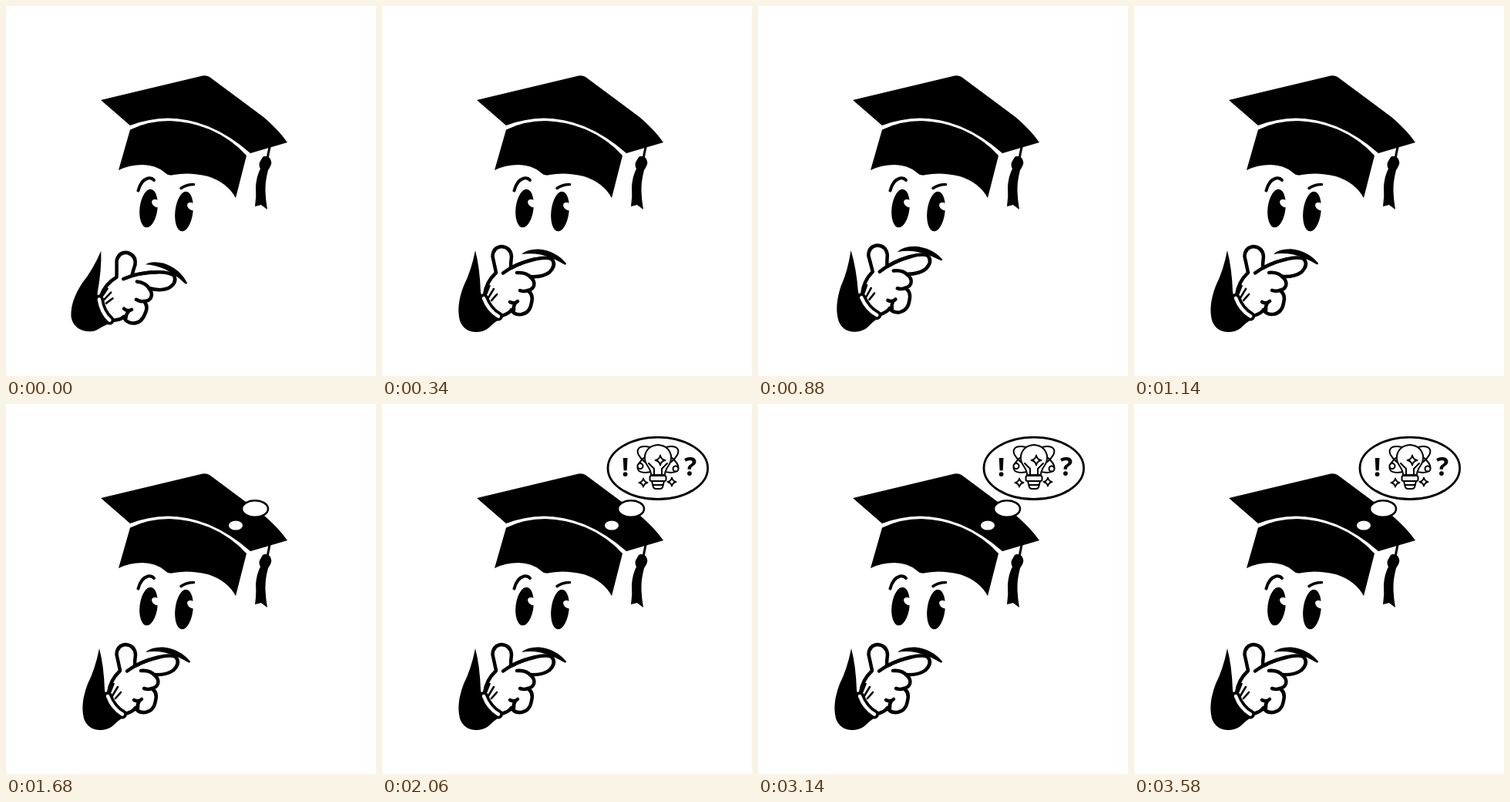
Recreate the animation shown at these times as an HTML page. Size 480x480 px, loop 3600 ms.

```html
<!DOCTYPE html>
<html lang="en">
<head>
<meta charset="utf-8">
<title>Thinking graduate</title>
<style>
html, body { margin: 0; width: 100%; height: 100%; overflow: hidden; background: #fff; }
svg { display: block; width: 100vw; height: 100vh; }
.ln { fill: none; stroke: #000; stroke-linecap: round; stroke-linejoin: round; }
.wh { fill: #fff; stroke: #000; stroke-linecap: round; stroke-linejoin: round; }
text { font: bold 34px "Noto Sans", "Open Sans", sans-serif; text-anchor: middle; }
</style>
</head>
<body>
<svg viewBox="0 0 480 480">
  <!-- cap -->
  <path d="M123 122L255 90.500Q260 89.500 264 92L334 144Q353 160 365 177L317 191Q291 168 262 156Q236 145.500 210 145.500Q184 146 161 155Z"/>
  <path d="M161 160.500Q184 149 212 149Q238 149.500 264 160Q292 172 312 194L298 249Q287 229 262 221Q238 215 217 219Q211 221 206 216Q194 206 177 206Q160 206 146 213Z"/>
  <!-- tassel -->
  <path class="ln" stroke-width="3" d="M342 183L339 198"/>
  <path d="M333 196Q337 193 342 197Q346 203 343 208L340 213Q336 228 336.500 241Q337 253 339 264L331 258L323 260Q325 247 324 234Q325 221 330 211Q327 206 330 201Z"/>
  <!-- face -->
  <ellipse cx="185" cy="262.500" rx="11.500" ry="25" transform="rotate(7 185 262.500)"/>
  <ellipse cx="231" cy="266.500" rx="11.500" ry="26" transform="rotate(7 231 266.500)"/>
  <ellipse fill="#fff" cx="195" cy="256" rx="6.500" ry="4.500" transform="rotate(35 195 256)"/>
  <ellipse fill="#fff" cx="241" cy="260" rx="6.500" ry="4.500" transform="rotate(35 241 260)"/>
  <path class="ln" stroke-width="4" d="M171.500 239.500Q175 226 184 223.500Q189 222.500 192 226"/>
  <path class="ln" stroke-width="3.500" d="M227 236.500Q234 231.500 243.500 231.500"/>

  <g id="arm">
    <path d="M121 317Q127 340 128 371L131 384L152 407Q146 410 138 418Q132 423 121 423Q106 422 101 408Q96 389 106 363Q116 343 121 317Z"/>
    <!-- glove -->
    <path class="wh" stroke-width="4.500" d="M133 375Q135 358 148 346Q146 336 143.500 325Q144 313 155 312Q167 313 168 325Q167 333 167 340Q182 332 198 328.500Q212 325 220 328Q227 336 217 345.500Q208 352 192 351Q199 357 197 363Q195 368 189 369Q197 374 194 385Q192 398 181 400Q171 401 168 394Q165 399 155 402Q140 396 133 375Z"/>
    <path class="ln" stroke-width="4.500" d="M157 346.500Q174 334 198 328.500M175 346Q187 345 193 352M179 369Q185 371 189 369M166 384Q172 387 176 383M173 385Q170 390 171 395"/>
    <path class="ln" stroke-width="12" d="M132 379Q138 395 151 402.500"/>
    <path class="ln" stroke-width="4.500" style="stroke:#fff" d="M132 379Q138 395 151 402.500"/>
    <path class="ln" stroke-width="2.600" d="M135.500 373L139.500 363M138 378.500L145 367M142 382L149 374"/>
    <path d="M181 322Q188 315 204 315.500Q226 318 239 334Q239 336.500 236 335Q222 326.500 206 322.500Q193 320 181 322Z"/>
  </g>

  <g id="small"><ellipse class="wh" cx="298" cy="157.500" rx="10" ry="7" stroke-width="2"/></g>
  <g id="mid"><ellipse class="wh" cx="323" cy="136" rx="17" ry="10.800" stroke-width="2.500"/></g>
  <g id="big">
    <ellipse class="wh" cx="357.800" cy="83.300" rx="64.800" ry="40.200" stroke-width="2.800"/>
    <text x="315.500" y="94">!</text>
    <text x="400" y="93">?</text>
    <g class="ln" stroke-width="2">
      <ellipse cx="358" cy="72" rx="29" ry="12" transform="rotate(27 358 72)"/>
      <ellipse cx="358" cy="72" rx="29" ry="12" transform="rotate(-27 358 72)"/>
      <path class="wh" d="M349 92Q349 87 345 81Q340 74 341 67Q344 54 358 53Q372 54 375 67Q376 74 371 81Q367 87 367 92Z"/>
      <path d="M353 92V84L346 77M363 92V84L370 77"/>
      <rect class="wh" x="347.500" y="93" width="21" height="7" rx="2"/>
      <path class="wh" d="M350 100H366L364 108Q363 110 361 110H355Q353 110 352 108ZM351 105H365"/>
      <circle class="wh" cx="335" cy="80.500" r="3.500"/>
      <circle class="wh" cx="381" cy="84" r="3.500"/>
      <path id="stars" class="wh" stroke-width="1.800"/>
    </g>
  </g>
</svg>
<script>
const LOOP = 3600;
const el = id => document.getElementById(id);
const clamp = v => Math.max(0, Math.min(1, v));

const star = (x, y, r) =>
  `M${x} ${y - r}Q${x + 1} ${y - 1} ${x + r} ${y}Q${x + 1} ${y + 1} ${x} ${y + r}` +
  `Q${x - 1} ${y + 1} ${x - r} ${y}Q${x - 1} ${y - 1} ${x} ${y - r}Z`;
el('stars').setAttribute('d', star(361, 73, 6.5) + star(339, 102, 5.5) + star(376, 101, 5.5));

// The arm swings up past its resting angle, then settles back.
function armAngle(t) {
  const start = 12.3, peak = -4.2;
  if (t < 640) return start + (peak - start) * Math.sin(t / 640 * Math.PI / 2);
  return peak * (1 + Math.cos(Math.PI * clamp((t - 640) / 560))) / 2;
}

const bubbles = [
  { id: 'small', x: 298, y: 157.5, at: 1240 },
  { id: 'mid', x: 323, y: 136, at: 1440 },
  { id: 'big', x: 357.8, y: 83.3, at: 1780 }
];

function draw(t) {
  el('arm').setAttribute('transform', `rotate(${armAngle(t)} 119 328)`);
  for (const { id, x, y, at } of bubbles) {
    const p = clamp((t - at) / 160), s = 1 - (1 - p) ** 3;
    el(id).setAttribute('visibility', p > 0 ? 'visible' : 'hidden');
    el(id).setAttribute('transform', `translate(${x} ${y}) scale(${s}) translate(${-x} ${-y})`);
  }
}

const t0 = performance.now();
function tick(now) {
  draw(Math.max(0, now - t0) % LOOP);
  requestAnimationFrame(tick);
}
draw(0);
requestAnimationFrame(tick);
</script>
</body>
</html>
```
